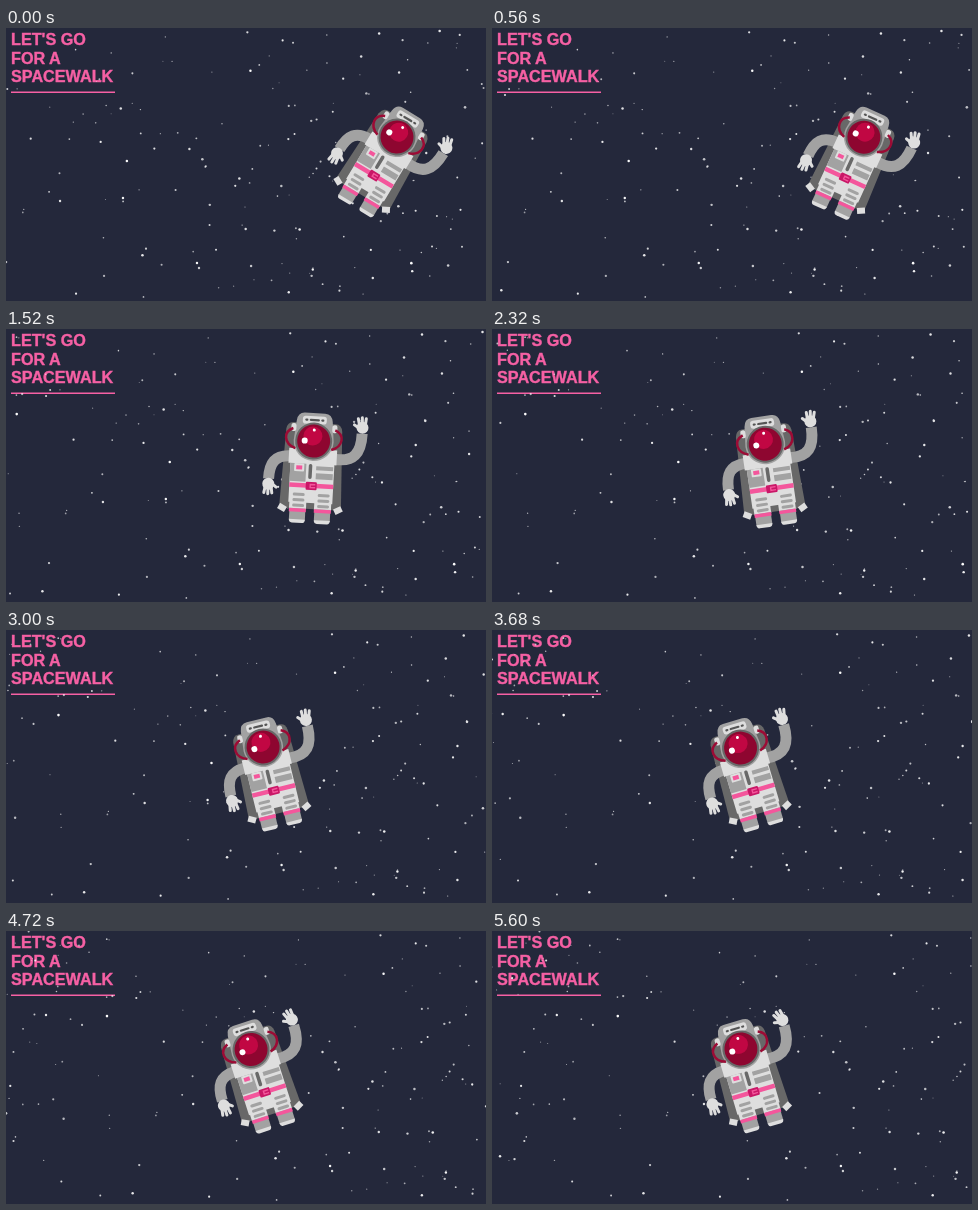
Animation of 480 by 273 pixels, one loop 5.64 s. Source, as an HTML page:

```html
<!DOCTYPE html>
<html lang="en">
<head>
<meta charset="utf-8">
<title>Spacewalk</title>
<style>
  html, body { margin: 0; width: 100%; height: 100%; overflow: hidden; background: #24283b; }
  svg { display: block; width: 100%; height: 100%; }
  text { font: bold 16.2px "Liberation Sans", Arial, sans-serif; fill: #f660a4; stroke: #f660a4; stroke-width: .4; }
  .light { fill: #dedede; }
  .grey { fill: #a2a2a2; }
  .dark { fill: #686868; }
  .pink { fill: #f4569c; }
  .arm { fill: none; stroke: #a2a2a2; stroke-width: 11; }
  .tube { fill: none; stroke: #9c0b35; stroke-width: 2.5; }
  .stripe { fill: none; stroke: #a2a2a2; stroke-width: 3; stroke-linecap: round; }
</style>
</head>
<body>
<svg viewBox="0 0 480 273">
  <defs>
    <g id="hand" class="light">
      <circle r="6"/>
      <path d="M-3-3L-4-9M0-3V-10M3-3L4-9M-4 0L-8-3" fill="none" stroke="#dedede" stroke-width="3" stroke-linecap="round"/>
    </g>
    <g id="leg">
      <path class="light" d="M-8.5 50h17v19h-17z"/>
      <path class="stripe" d="M-4 54H5M-4 59.5H5M-4 65H5"/>
      <path class="grey" d="M-8 68H8V80H-8z"/>
      <path class="pink" d="M-8.5 68h17v3.5h-17z"/>
      <path class="light" d="M-8 79H8Q8 82.5 5 82.5H-5Q-8 82.5-8 79z"/>
    </g>
  </defs>

  <text x="5" y="17.3">LET'S GO</text>
  <text x="5" y="35.8">FOR A</text>
  <text x="5" y="54.3">SPACEWALK</text>
  <path d="M5 64.2H109" stroke="#f660a4" stroke-width="1.4"/>
  <g id="stars" fill="#fff"></g>

  <g id="astronaut">
    <!-- backpack -->
    <path class="dark" d="M-21-18H21Q27-18 28-11L31 68H-31L-28-11Q-27-18-21-18z"/>
    <rect class="light" x="-4" y="-3" width="8" height="6" transform="translate(-28 68) rotate(28)"/>
    <rect class="light" x="-4" y="-3" width="8" height="6" transform="translate(28 68) rotate(-28)"/>

    <!-- arms -->
    <path class="arm" d="M-22 16C-38 16-43 24-43 40"/>
    <path class="arm" d="M22 17C41 19 48 10 48-10"/>
    <use href="#hand" transform="translate(-43 45) rotate(180)"/>
    <g transform="translate(48 -16)"><use id="wave" href="#hand"/></g>

    <!-- legs and torso -->
    <path class="light" d="M-24 8H24V23H22V62H-22V23H-24z"/>
    <use href="#leg" x="-12.5"/>
    <use href="#leg" x="12.5"/>
    <path class="grey" d="M-22 23H-6V41H-22zM4 25H21V29H4zM4 32H21V38H4z"/>
    <rect class="light" x="-18" y="23" width="10" height="8" rx="1"/>
    <rect class="pink" x="-16" y="25" width="6" height="4"/>
    <rect class="dark" x="-3.5" y="23" width="3.5" height="15" rx="1.7"/>
    <path class="pink" d="M-22 42.5h44v4.5h-44z"/>
    <rect x="-5.5" y="41" width="11" height="8" rx="1" fill="#c91767"/>
    <path d="M4 43.5H-1V46.500H4" fill="none" stroke="#f4569c" stroke-width="1.4"/>

    <!-- helmet -->
    <path class="grey" d="M-10-28H10Q17-28 18-20L20 0A20 20 0 0 1-20 0L-18-20Q-17-28-10-28z"/>
    <rect class="light" x="-12" y="-25" width="24" height="8" rx="3"/>
    <path d="M-4-21H4M-8.5-21h1M7.5-21h1" stroke="#555" stroke-width="2.2" stroke-linecap="round"/>
    <rect class="light" x="-23" y="-17" width="5" height="8" rx="2"/>
    <rect class="light" x="18" y="-17" width="5" height="8" rx="2"/>
    <circle class="dark" r="18.5"/>
    <circle r="16.5" fill="#8e0630"/>
    <circle cx="-1" cy="-5" r="9.5" fill="#c10743"/>
    <circle cx="-9" cy="0" r="3" fill="#fff"/>
    <circle cx="0" cy="-11" r="1.5" fill="#fff"/>
    <path class="tube" d="M-21-12C-31-8-30 4-18 8M21-12C31-8 30 4 18 8"/>
  </g>
</svg>

<script>
const LOOP = 5640, STEP = 40, DRIFT = 0.0282, SWING = 4600;
const $ = id => document.getElementById(id);
const move = (id, transform) => $(id).setAttribute("transform", transform);

let seed = 7;
const random = () => (seed = seed * 16807 % 2147483647) / 2147483647;

// The field reaches far enough left to fill the stage as it drifts right.
const reach = LOOP * DRIFT;
let sky = "";
for (let i = 0; i < 230; i++) {
  const x = random() * (480 + reach) - reach, y = random() * 273, size = random();
  sky += `<circle cx="${x}" cy="${y}" r="${0.5 + 0.8 * size}" opacity="${0.4 + 0.3 * size + 0.3 * random()}"/>`;
}
$("stars").innerHTML = sky;

// cubic-bezier(.25, .1, .25, 1), solved by bisection
function ease(p) {
  const bezier = (a, b, s) => 3 * a * s * (1 - s) ** 2 + 3 * b * s * s * (1 - s) + s ** 3;
  let low = 0, high = 1;
  for (let i = 0; i < 20; i++) {
    const mid = (low + high) / 2;
    if (bezier(0.25, 0.25, mid) < p) low = mid; else high = mid;
  }
  return bezier(0.1, 1, low);
}

function draw() {
  const t = Math.floor(performance.now() % LOOP / STEP) * STEP;
  // Swing left, then begin to drift back.
  const back = Math.max(0, t - SWING) / 1000;
  const swing = ease(Math.min(1, t / SWING)) - 0.027 * back ** 2;
  const x = 391 - 146 * swing, y = 109 + 9.5 * swing ** 2;
  move("stars", `translate(${t * DRIFT} 0)`);
  move("astronaut", `translate(${x} ${y}) rotate(${31 - 48.8 * swing})`);
  move("wave", `rotate(${-6 - 16 * Math.cos(2 * Math.PI * t / LOOP)})`);
  requestAnimationFrame(draw);
}
draw();
</script>
</body>
</html>
```
